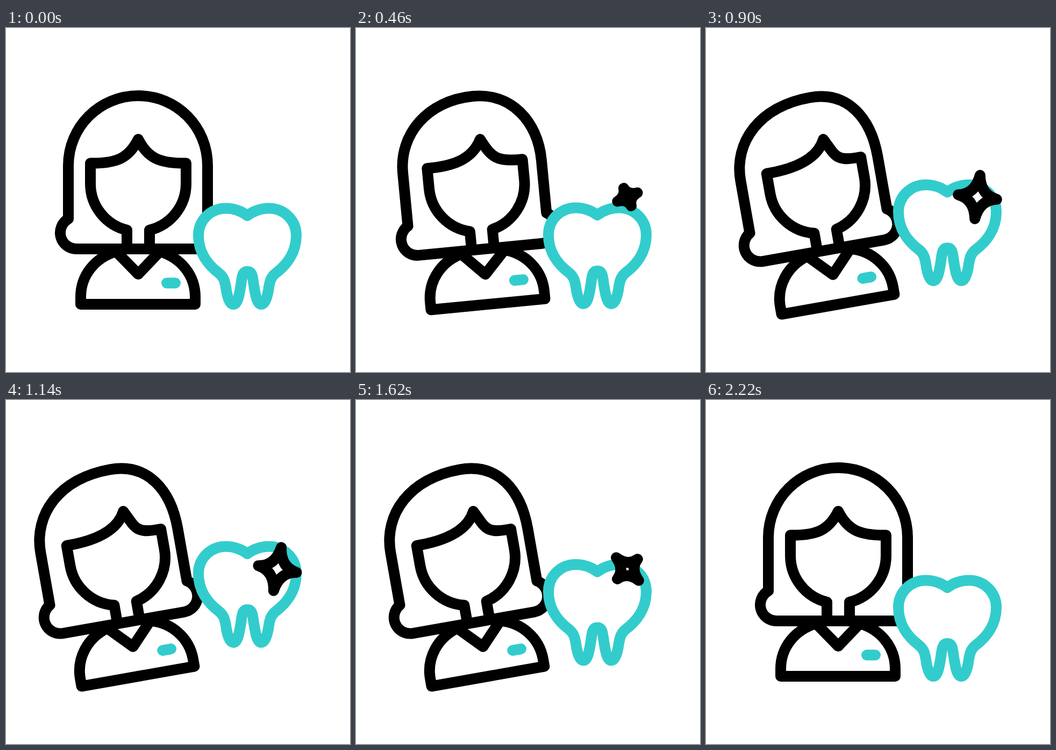
Animation, 640 px wide and 640 px high, one loop 2.4 s. Source, as an HTML page:

```html
<!DOCTYPE html>
<html>
<head>
<meta charset="utf-8">
<title>Dentist</title>
<style>
html, body { margin: 0; width: 100%; height: 100%; overflow: hidden; background: #fff; }
svg { display: block; width: 100%; height: 100%; }
path { fill: none; stroke: #000; stroke-width: 20; stroke-linecap: round; stroke-linejoin: round; }
path.teal { stroke: #33cccc; }
path.solid { fill: #fff; }
</style>
</head>
<body>
<svg viewBox="0 0 640 640">
  <g id="person">
    <path id="hair"/>
    <path id="face"/>
    <path d="M205 416C166 427 139 460 139 500V514H352V500C352 460 325 427 286 416L246 458Z"/>
    <path class="teal" d="M299 474.500H315"/>
  </g>
  <path id="tooth" class="teal solid" d="M449 349C437 340 424 335.500 409 335.500C381 335.500 358 357 358 386
    C358 418 376 441 396 456C406 464 407 472 409 482C411 498 416 514 423 514C431 514 434 497 437 478
    C439 462 440 453 449 453C458 453 459 462 461 478C464 497 467 514 475 514C482 514 487 498 489 482
    C491 472 492 464 502 456C522 441 540 418 540 386C540 357 517 335.500 489 335.500C474 335.500 461 340 449 349Z"/>
  <path id="spark" class="solid" vector-effect="non-scaling-stroke"
    d="M0 -40.800Q4.800 -4.800 36 0Q4.800 4.800 0 40.800Q-4.800 4.800 -36 0Q-4.800 -4.800 0 -40.800Z"/>
</svg>
<script>
const LOOP = 2400;
const [person, hair, face, tooth, spark] =
  ['person', 'hair', 'face', 'tooth', 'spark'].map(id => document.getElementById(id));

// Cubic ease from 0 to 1 with a chosen starting speed and a soft stop.
const ease = (u, speed = 0) => {
  u = Math.min(1, Math.max(0, u));
  return speed * u * (1 - u) ** 2 + u * u * (3 - 2 * u);
};
const span = (t, from, to) => (t - from) / (to - from);

// Leaning the person also turns the head: the hair slides back, the parting forward.
function drawPerson(lean) {
  const back = -9 * lean, top = 246 + 15 * lean, tip = 246 + 26 * lean;
  const left = 116 + back, right = 375 + back;
  person.setAttribute('transform', `rotate(${-10 * lean} 246 514)`);
  hair.setAttribute('d', `M${left} 355V256C${left} 184 ${left + 58} 126 ${top} 126
    C${top + 72} 126 ${right} 184 ${right} 256V355
    A30 30 0 0 1 ${right - 15} 411H${left + 15}A30 30 0 0 1 ${left} 355Z`);
  face.setAttribute('d', `M225 408V376A89 89 0 0 1 157 290V251.500C205 252 ${tip - 18} 243 ${tip} 207
    C${tip + 18} 243 287 252 335 251.500V290A89 89 0 0 1 267 376V408`);
}

function drawSpark(t) {
  const size = Math.min(ease(span(t, 200, 820), 0.8), ease(span(t, 2020, 1360), 0.8));
  const angle = 10 + (t - 1140) * 0.0135 - 226 * (1 - size);
  spark.style.display = size > 0 ? '' : 'none';
  spark.setAttribute('transform', `translate(505 314.500) rotate(${angle}) scale(${size})`);
}

function draw(now) {
  const t = now % LOOP;
  drawPerson(ease(span(t, 190, 700)) - ease(span(t, 1700, 2215)));
  const lift = ease(span(t, 400, 1200)) - ease(span(t, 1200, 2000));
  tooth.setAttribute('transform', `translate(0 ${-64 * lift})`);
  drawSpark(t);
}

const start = performance.now();
function tick() {
  draw(performance.now() - start);
  requestAnimationFrame(tick);
}
tick();
</script>
</body>
</html>
```
